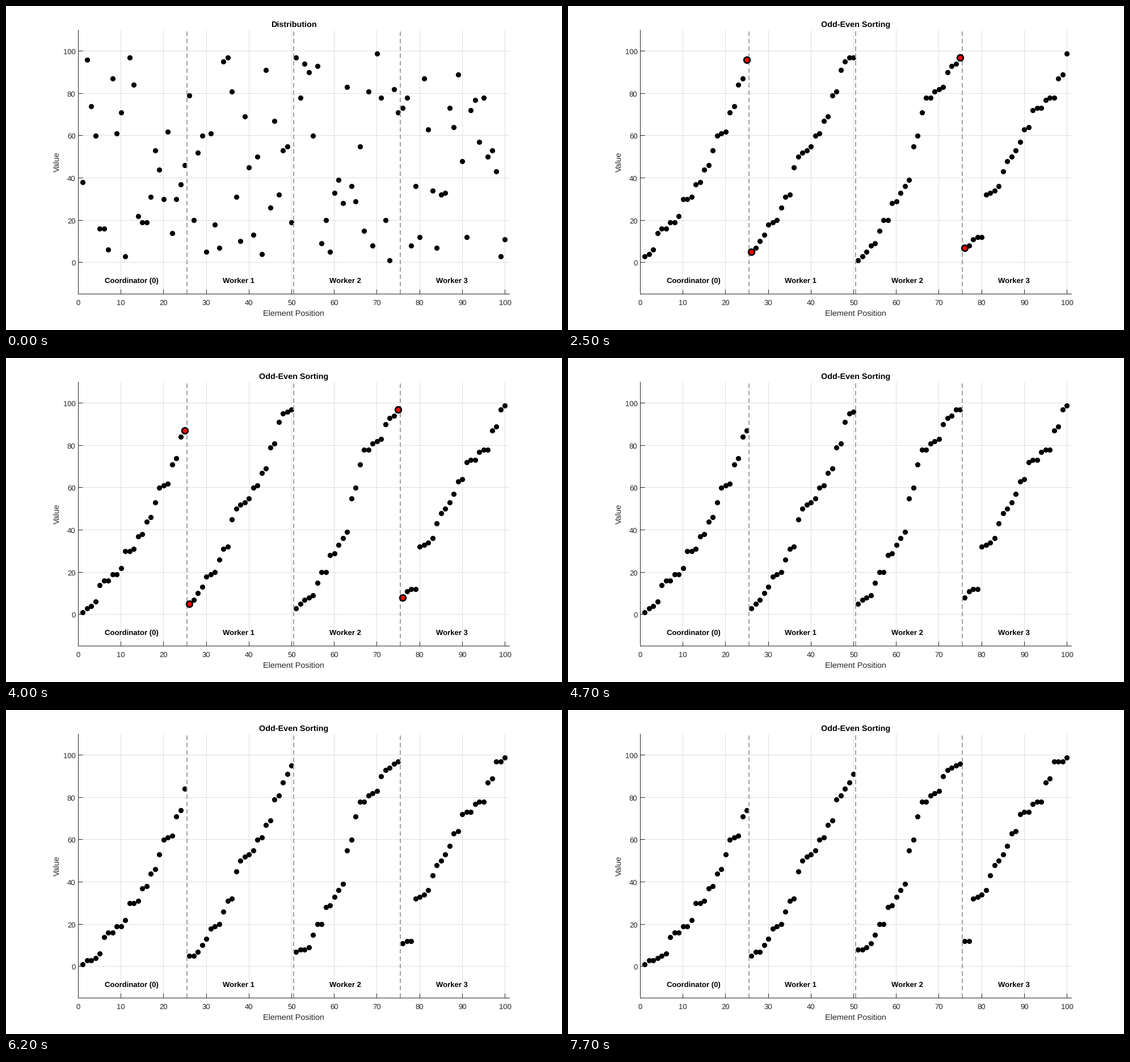
Write a matplotlib script that moves like this. It is 980 px wide and 572 px high and loops after 8000 ms.

```python
import matplotlib.pyplot as plt
import numpy as np
from matplotlib.animation import FuncAnimation
from matplotlib.transforms import Affine2D

W, H, DPI = 980, 572, 96
PX = 72 / DPI  # points per pixel
INTERVAL, LOOP = 50, 8000
INK = "#262626"
COUNT, BLOCK = 100, 25

# Axes rectangle in pixels; y runs down from the top.
LEFT, TOP, WIDTH, HEIGHT = 127.0, 42.0, 759.5, 466.18
X_MAX, Y_MIN, Y_MAX = 101, -15, 110

plt.rcParams["font.family"] = "Liberation Sans"
plt.rcParams["text.hinting"] = "none"


def sort_blocks(values):
    return np.sort(values.reshape(-1, BLOCK), axis=1).ravel()


def exchange(values, borders):
    """Swap the neighbours across each border if out of order, then sort every block."""
    values = values.copy()
    for b in borders:
        values[b - 1:b + 1] = np.sort(values[b - 1:b + 1])
    return sort_blocks(values)


def build_scenes():
    """List of (start in ms, title, values, highlighted positions)."""
    values = np.ceil(100 * np.random.RandomState(42).rand(COUNT)).astype(int)
    scenes = [(0, "Distribution", values, [])]
    values = sort_blocks(values)
    scenes.append((500, "Presort", values, []))
    for start in range(2500, LOOP, 1500):
        for delay, first in ((0, BLOCK), (350, 2 * BLOCK)):
            borders = range(first, COUNT, 2 * BLOCK)
            values = exchange(values, borders)
            marked = [p for b in borders for p in (b, b + 1)]
            scenes.append((start + delay, "Odd-Even Sorting", values, marked))
        scenes.append((start + 700, "Odd-Even Sorting", values, []))
    return scenes


SCENES = build_scenes()

fig = plt.figure(figsize=(W / DPI, H / DPI), dpi=DPI, facecolor="white")
ax = fig.add_axes([LEFT / W, 1 - (TOP + HEIGHT) / H, WIDTH / W, HEIGHT / H])
ax.set(xlim=(0, X_MAX), ylim=(Y_MIN, Y_MAX),
       xticks=range(0, 101, 10), yticks=range(0, 101, 20))
ax.set_axisbelow(True)
ax.grid(color="#dfdfdf", linewidth=PX)
ax.tick_params(direction="in", length=7.6 * PX, width=PX, color=INK,
               labelbottom=False, labelleft=False)
ax.spines[["top", "right"]].set_visible(False)
for side in ("left", "bottom"):
    ax.spines[side].set(color=INK, linewidth=PX)


def label(x, y, text, size=9.8, color=INK, ha="center", **style):
    """Text with its baseline at pixel (x, y), measured from the top left."""
    return fig.text(x / W, 1 - y / H, text, size=size, color=color,
                    ha=ha, va="baseline", **style)


def x_px(x):
    return LEFT + 0.5 + WIDTH * x / X_MAX


def y_px(y):
    return TOP + 0.5 + HEIGHT * (Y_MAX - y) / (Y_MAX - Y_MIN)


for tick in range(0, 101, 10):
    label(x_px(tick), 528, str(tick))
for tick in range(0, 101, 20):
    label(122.5, y_px(tick) + 5.4, str(tick), ha="right")
label(507, 547, "Element Position", size=10.8)
label(94, 275.5, "Value", size=10.8, rotation=90, rotation_mode="anchor")
title = label(507, 37, "", size=10.8, color="black", weight="bold")

for i in range(COUNT // BLOCK):
    name = f"Worker {i}" if i else "Coordinator (0)"
    label(x_px(BLOCK * (i + 0.5)), 489, name, color="black", weight="bold")
    if i:
        ax.axvline(BLOCK * i + 0.5, color="#a2a2a2", linewidth=2 * PX,
                   linestyle=(0, (4, 2.5)), dash_capstyle="butt", zorder=4)

# Lines snap to pixel centres, markers to pixel corners: offset the markers by half a pixel.
marker_space = ax.transData + Affine2D().translate(0.5, -0.5)
dots, = ax.plot([], [], "o", color="black", markersize=9.2 * PX, markeredgewidth=0,
                zorder=3, clip_on=False, transform=marker_space)
marks, = ax.plot([], [], "o", markerfacecolor="red", markeredgecolor="black",
                 markersize=8, markeredgewidth=2, zorder=5, clip_on=False,
                 transform=marker_space)


def draw(frame):
    now = frame * INTERVAL
    _, name, values, marked = [s for s in SCENES if s[0] <= now][-1]
    title.set_text(name)
    dots.set_data(np.arange(1, COUNT + 1), values)
    marks.set_data(marked, [values[p - 1] for p in marked])
    return title, dots, marks


anim = FuncAnimation(fig, draw, frames=LOOP // INTERVAL, interval=INTERVAL,
                     repeat=True, repeat_delay=0, blit=False)
plt.show()
```
